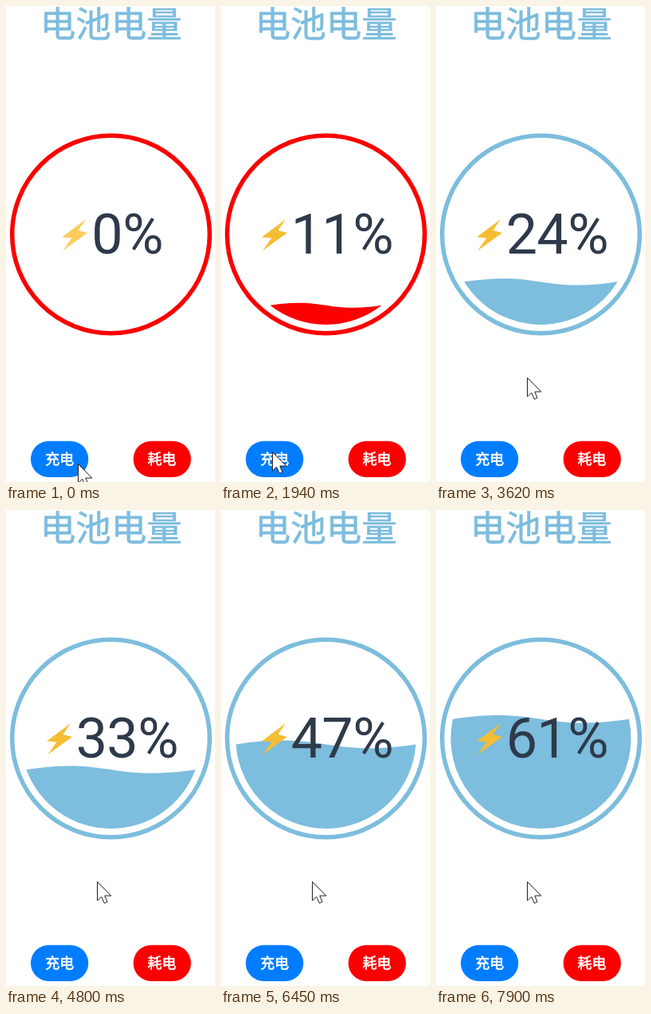
An HTML page that plays this animation: 262 by 596 pixels, repeating every 8 s.

```html
<!DOCTYPE html>
<html lang="zh-CN">
<head>
<meta charset="utf-8">
<title>电池电量</title>
<style>
  html, body { margin: 0; width: 100%; height: 100%; overflow: hidden; background: #fff; }
  svg { display: block; }
  text { text-anchor: middle; font-family: "Noto Sans CJK SC", "Noto Sans CJK", sans-serif; }
  .title { font-size: 44.5px; fill: #7dbddd; stroke: #7dbddd; stroke-width: .6px; }
  .label { font-size: 18px; fill: #fff; stroke: #fff; stroke-width: .6px; }
  #percent { font: 70px Roboto, sans-serif; fill: #2e3a4a; }
</style>
</head>
<body>
<svg width="262" height="596" viewBox="0 0 262 596">
  <text class="title" x="131.7" y="38.5">电池电量</text>
  <circle id="ring" cx="131.5" cy="286" r="123.8" fill="none" stroke-width="5.5"/>
  <path id="water"/>
  <path id="bolt" d="M100 267 70 289.5 82.5 290.5 71 306.5 102 284 90.5 281Z"/>
  <text id="percent" y="310"></text>
  <rect id="charge" x="31" y="544.7" width="72.3" height="45.2" rx="22.6"/>
  <text class="label" x="67.3" y="573.5">充电</text>
  <rect x="159.6" y="544.7" width="72.3" height="45.2" rx="22.6" fill="#fa0000"/>
  <text class="label" x="195.5" y="573.5">耗电</text>
  <path id="cursor" d="M.5 .5V24L5.7 19.3 9.3 27.3 13 25.7 9.8 18H17.8Z" fill="#fff" stroke="#2b1a1e"/>
</svg>
<script>
const LOOP = 8000, CX = 131.5, CY = 286, RADIUS = 113;
const RED = '#fa0000', BLUE = '#7dbddd';

const [ring, water, bolt, percent, charge, cursor] =
  ['ring', 'water', 'bolt', 'percent', 'charge', 'cursor'].map(id => document.getElementById(id));

function set(el, attrs) {
  for (const name in attrs) el.setAttribute(name, attrs[name]);
}

const progress = (t, from, to) => Math.min(1, Math.max(0, (t - from) / (to - from)));

// Charging starts with the click and speeds up slightly.
function levelAt(t) {
  const s = Math.max(0, t - 410) / 1000;
  return Math.floor(6.98 * s + 0.157 * s * s);
}

function waterPath(p) {
  if (!p) return '';
  const y = CY + RADIUS * (1 - p / 50) + 0.6;
  const half = Math.sqrt(RADIUS ** 2 - (y - CY) ** 2);
  const left = CX - half, right = CX + half, bend = half * 0.15;
  return `M${left} ${y}C${CX} ${y - bend} ${CX} ${y + bend} ${right} ${y}` +
    `A${RADIUS} ${RADIUS} 0 ${y < CY ? 1 : 0} 1 ${left} ${y}Z`;
}

function draw(t) {
  const p = levelAt(t);
  const color = p < 20 ? RED : BLUE;
  const twoDigits = p > 9;
  set(ring, { stroke: color });
  set(water, { d: waterPath(p), fill: color });
  set(bolt, { transform: `translate(${twoDigits ? -19 : 0})`, fill: p ? '#f5bd33' : '#ffcb5c' });
  set(percent, { x: twoDigits ? '107.5 146 191' : '127 172' });
  percent.textContent = p + '%';
  set(charge, { fill: t > 410 && t < 560 ? '#0071e6' : '#007dff' });

  const press = progress(t, 90, 400), leave = progress(t, 2150, 2680);
  set(cursor, { transform: `translate(${90 - 26 * press + 50 * leave} ${573 - 15 * press - 93 * leave})` });
}

const start = performance.now();
function tick() {
  draw((performance.now() - start) % LOOP);
  requestAnimationFrame(tick);
}
tick();
</script>
</body>
</html>
```
